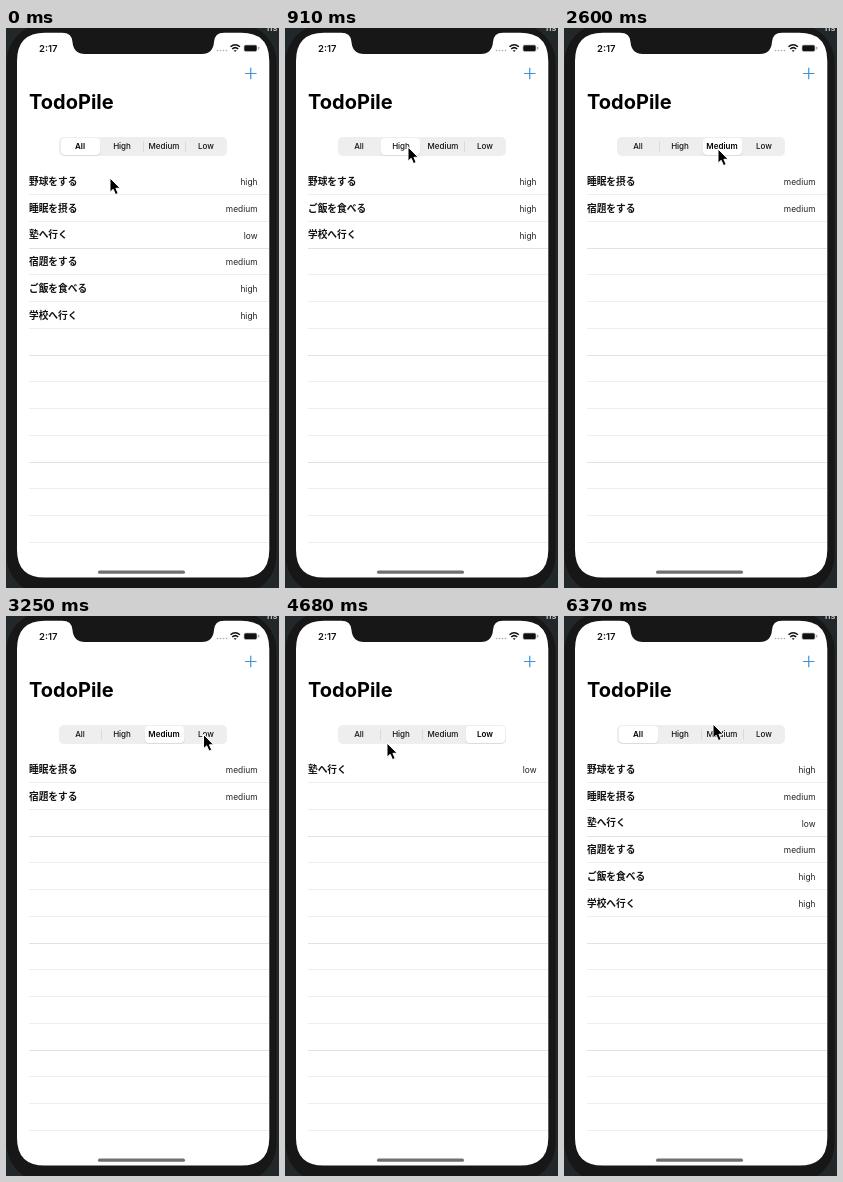
These frames come from a looping animation (273x560 px, 6500 ms). An HTML page:

```html
<!DOCTYPE html>
<html lang="ja">
<head>
<meta charset="utf-8">
<title>TodoPile</title>
<style>
  html, body { margin: 0; width: 100%; height: 100%; overflow: hidden; background: #20272b; }
  svg { display: block; width: 273px; height: 560px; }
  text { font-family: Inter, Roboto, sans-serif; fill: #111; }
  .title { font-size: 20px; font-weight: 700; fill: #000; }
  .clock { font-size: 9.5px; font-weight: 600; }
  .tab { font-size: 8px; font-weight: 500; text-anchor: middle; }
  .tab.on { font-weight: 600; fill: #000; }
  .task { font: 700 9.7px "Noto Sans CJK JP", "Noto Sans CJK", sans-serif; }
  .level { font-size: 8.4px; text-anchor: end; fill: #222; }
</style>
</head>
<body>
<svg viewBox="0 0 273 560">
  <rect width="273" height="560" fill="#22272a"/>
  <text x="261" y="3.300" font-size="9" font-weight="600" style="fill:#ccc">ns</text>
  <rect x="0.5" y="-4" width="270" height="570" rx="38" fill="#171717"/>
  <path fill="#fff" d="M39 4.700H56Q66 4.700 66.500 14Q67.500 26 79 26H196Q207 26 208 14Q208.500 4.700 218 4.700H235.300Q263.300 4.700 263.300 33V522Q263.300 549.600 235.300 549.600H39Q11 549.600 11 522V33Q11 4.700 39 4.700Z"/>

  <text class="clock" x="33" y="24">2:17</text>
  <g fill="#aaa">
    <circle cx="211.500" cy="22.500" r=".8"/><circle cx="214.500" cy="22.500" r=".8"/>
    <circle cx="217.500" cy="22.500" r=".8"/><circle cx="220.500" cy="22.500" r=".8"/>
  </g>
  <g fill="none" stroke="#111" stroke-width="1.500">
    <path d="M224.500 18.800Q229.200 14.600 233.900 18.800M226.200 21Q229.200 18.300 232.200 21"/>
    <path d="M227.700 22.300H230.700L229.200 23.900Z" fill="#111" stroke="none"/>
  </g>
  <rect x="238" y="17" width="13" height="6.500" rx="1.700" fill="#111" stroke="#bbb" stroke-width=".7"/>
  <rect x="252.200" y="18.800" width="1.100" height="2.800" rx=".5" fill="#999"/>

  <path d="M239 45.500H250.500M244.750 39.700V51.300" stroke="#3f92d8" stroke-width="1.200"/>
  <text class="title" x="23" y="81">TodoPile</text>

  <rect x="53" y="109" width="168" height="19" rx="5" fill="#eeeeef"/>
  <g id="dividers"></g>
  <g id="thumb">
    <rect x="-.4" y="110.500" width="40.800" height="17.300" rx="4.800" fill="#000" opacity=".1"/>
    <rect y="110" width="40" height="17" rx="4.500" fill="#fff"/>
  </g>
  <g id="tabs"></g>
  <g id="lines"></g>
  <g id="list"></g>

  <rect x="92" y="542.500" width="87" height="3.300" rx="1.650" fill="#707070"/>
  <path id="cursor" d="M0 0V14.200L3.200 11.300 5.500 16.600 8.200 15.400 5.900 10.300H10.200Z" fill="#000" stroke="#fff" stroke-width="1" stroke-linejoin="round"/>
</svg>
<script>
const LOOP = 6500, STEP = 130, SLIDE = 420, ROW = 26.75;
const levels = ['All', 'High', 'Medium', 'Low'];
const tasks = [
  ['野球をする', 'high'], ['睡眠を摂る', 'medium'], ['塾へ行く', 'low'],
  ['宿題をする', 'medium'], ['ご飯を食べる', 'high'], ['学校へ行く', 'high'],
];
// [time, selected tab]
const taps = [[-1000, 0], [530, 1], [2211, 2], [3641, 3], [5331, 0]];
// [time, x, y] of the pointer tip
const path = [
  [0, 104, 150], [390, 118, 120], [780, 118, 120], [910, 123, 119],
  [1170, 134, 162], [1300, 142, 167], [1430, 148, 158], [1560, 151, 142],
  [1950, 154, 121], [2600, 154, 121], [2990, 196, 120], [3120, 196, 120],
  [3250, 197.5, 118.5], [4160, 197.5, 118.5], [4680, 102, 127],
  [4940, 66, 122], [5070, 70, 119], [5980, 70, 119], [6370, 149, 108], [LOOP, 149, 108],
];

const $ = id => document.getElementById(id);
const mix = (a, b, p) => a + (b - a) * p;
const label = (cls, x, y, text) => `<text class="${cls}" x="${x}" y="${y}">${text}</text>`;

$('tabs').innerHTML = levels.map((name, i) => label('tab', 74 + 42 * i, 121.3, name)).join('');
$('dividers').innerHTML = [0, 1, 2].map(i =>
  `<rect x="${95 + 42 * i}" y="113.500" width="1" height="10.500" fill="#dadadc"/>`).join('');
$('lines').innerHTML = Array.from({ length: 14 }, (_, k) =>
  `<rect x="23" y="${Math.floor(166.5 + ROW * k)}" width="240" height="1" fill="${k % 4 == 2 ? '#e2e2e2' : '#eee'}"/>`).join('');

let shown;
function showList(tab) {
  if (tab === shown) return;
  shown = tab;
  $('list').innerHTML = tasks
    .filter(([, level]) => !tab || level === levels[tab].toLowerCase())
    .map(([name, level], i) => label('task', 23, 156.8 + ROW * i, name) + label('level', 251.5, 157 + ROW * i, level))
    .join('');
}

function pointer(t) {
  const i = path.findIndex(key => key[0] > t);
  const [t0, x0, y0] = path[i - 1], [t1, x1, y1] = path[i];
  const p = (t - t0) / (t1 - t0);
  return [mix(x0, x1, p), mix(y0, y1, p)];
}

function draw(now) {
  const t = Math.floor(now % LOOP / STEP) * STEP;
  const n = taps.filter(tap => tap[0] <= t).length - 1;
  const [start, tab] = taps[n];
  const before = n ? taps[n - 1][1] : tab;
  const p = Math.min(1, (t - start) / SLIDE), done = p > .92;
  const x = 54.5 + 42 * mix(before, tab, done ? 1 : p * p * (3 - 2 * p));
  const bold = done ? tab : p < .5 ? before : -1;

  showList(tab);
  $('thumb').setAttribute('transform', `translate(${x})`);
  [...$('tabs').children].forEach((el, i) => el.classList.toggle('on', i === bold));
  [...$('dividers').children].forEach((el, i) =>
    el.setAttribute('opacity', Math.abs(x + 20 - 95.5 - 42 * i) < 24 ? 0 : 1));
  $('cursor').setAttribute('transform', `translate(${pointer(t)})`);
}

const began = performance.now();
function tick() {
  draw(performance.now() - began);
  requestAnimationFrame(tick);
}
tick();
</script>
</body>
</html>
```
